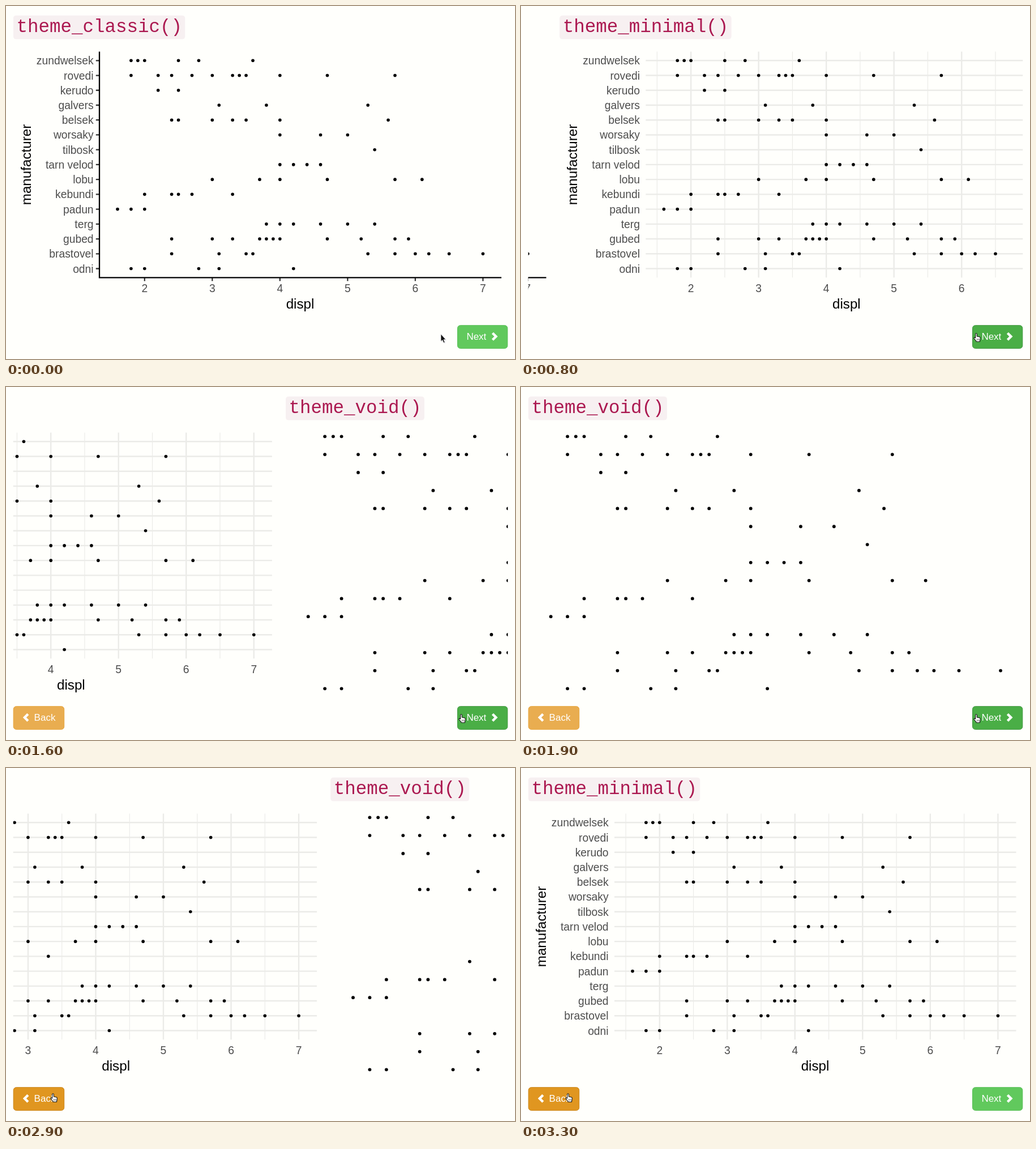
Recreate the animation shown at these times as an HTML page. Size 899 by 623 pixels, loop 3.5 s.

```html
<!DOCTYPE html>
<html lang="en">
<head>
<meta charset="utf-8">
<title>Plot themes</title>
<style>
  html, body { margin: 0; width: 100%; height: 100%; overflow: hidden; background: #fffffc; }
  svg { display: block; width: 899px; height: 623px; font-family: "Liberation Sans", Arial, sans-serif; }
  .code { font: 32.5px "Liberation Mono", "Courier New", monospace; fill: #ab1850; }
  .label { font-size: 19.3px; fill: #4d4d4d; }
  .axis { font-size: 24.2px; fill: #000; }
  .btn { font-size: 17px; fill: #fff; }
</style>
</head>
<body>
<script>
const LOOP = 3500, TICK = 100, STEP = 885.8, SLIDE = 400;

// label and engine sizes, top row first
const ROWS = [
  ['zundwelsek', 1.8, 1.9, 2, 2.5, 2.8, 3.6],
  ['rovedi', 1.8, 2.2, 2.4, 2.7, 3, 3.3, 3.4, 3.5, 4, 4.7, 5.7],
  ['kerudo', 2.2, 2.5],
  ['galvers', 3.1, 3.8, 5.3],
  ['belsek', 2.4, 2.5, 3, 3.3, 3.5, 4, 5.6],
  ['worsaky', 4, 4.6, 5],
  ['tilbosk', 5.4],
  ['tarn velod', 4, 4.2, 4.4, 4.6],
  ['lobu', 3, 3.7, 4, 4.7, 5.7, 6.1],
  ['kebundi', 2, 2.4, 2.5, 2.7, 3.3],
  ['padun', 1.6, 1.8, 2],
  ['terg', 3.8, 4, 4.2, 4.6, 5, 5.4],
  ['gubed', 2.4, 3, 3.3, 3.7, 3.8, 3.9, 4, 4.7, 5.2, 5.7, 5.9],
  ['brastovel', 2.4, 3.1, 3.5, 3.6, 5.3, 5.7, 6, 6.2, 6.5, 7],
  ['odni', 1.8, 2, 2.8, 3.1, 4.2]
];

function add(parent, tag, attrs = {}, text) {
  const el = document.createElementNS('http://www.w3.org/2000/svg', tag);
  for (const key in attrs) el.setAttribute(key, attrs[key]);
  if (text) el.textContent = text;
  parent.appendChild(el);
  return el;
}

const line = (g, x1, y1, x2, y2, stroke, width) =>
  add(g, 'line', { x1, y1, x2, y2, stroke, 'stroke-width': width });
const show = (el, on) => el.setAttribute('visibility', on ? 'visible' : 'hidden');
const move = (el, x, y = 0) => el.setAttribute('transform', `translate(${x} ${y})`);

const svg = add(document.body, 'svg', { viewBox: '0 0 899 623' });
const clip = add(svg, 'clipPath', { id: 'view' });
add(clip, 'rect', { x: 12.7, y: 0, width: 873.6, height: 560 });
const view = add(svg, 'g', { 'clip-path': 'url(#view)' });
const strip = add(view, 'g');

// plot scales: value to x, row to y
const framed = { x: v => 244.8 + (v - 2) * 119.52, y: i => 96.3 + i * 26.23, r: 2.8 };
const bare = { x: v => 82 + (v - 1.8) * 147.1, y: i => 87.3 + i * 31.79, r: 2.9 };

function addSlide(index, title) {
  const g = add(strip, 'g', { transform: `translate(${index * STEP} 0)` });
  add(g, 'rect', { x: 12.8, y: 16.8, width: title.length * 19.5 + 11, height: 41.8, rx: 5, fill: '#f7f0f1' });
  add(g, 'text', { class: 'code', x: 18.4, y: 46.4 }, title);
  return g;
}

function addDots(g, s) {
  ROWS.forEach(([, ...values], i) => values.forEach(v =>
    add(g, 'circle', { cx: s.x(v), cy: s.y(i), r: s.r })));
}

function addLabels(g, s) {
  ROWS.forEach(([name], i) =>
    add(g, 'text', { class: 'label', x: 154.6, y: s.y(i) + 7, 'text-anchor': 'end' }, name));
  for (let v = 2; v <= 7; v++)
    add(g, 'text', { class: 'label', x: s.x(v), y: 504.7, 'text-anchor': 'middle' }, String(v));
  add(g, 'text', { class: 'axis', x: 519.5, y: 533.8, 'text-anchor': 'middle' }, 'displ');
  add(g, 'text', { class: 'axis', transform: 'translate(44 280) rotate(-90)', 'text-anchor': 'middle' }, 'manufacturer');
}

function addAxes(g, s) {
  ROWS.forEach((_, i) => line(g, 158.8, s.y(i), 165, s.y(i), '#333', 2.3));
  for (let v = 2; v <= 7; v++) line(g, s.x(v), 479, s.x(v), 485.4, '#333', 2.3);
  add(g, 'path', { d: 'M165 80.4V479.3H875', fill: 'none', stroke: '#000', 'stroke-width': 2.3 });
}

function addGrid(g, s) {
  const color = '#ebebe8';
  for (let v = 1.5; v <= 7; v += 0.5)
    line(g, s.x(v), 80.4, s.x(v), 479.3, color, v % 1 ? 1.2 : 2.4);
  ROWS.forEach((_, i) => line(g, 165, s.y(i), 874.5, s.y(i), color, 2.4));
}

const classic = addSlide(0, 'theme_classic()');
addDots(classic, framed);
addAxes(classic, framed);
addLabels(classic, framed);

const minimal = addSlide(1, 'theme_minimal()');
addGrid(minimal, framed);
addDots(minimal, framed);
addLabels(minimal, framed);

addDots(addSlide(2, 'theme_void()'), bare);

// fill and border for each button state
const GREEN = { idle: ['#61c95d', '#57bf54'], hover: ['#4aae46', '#3f963c'], down: ['#3f963c', '#2f6b2c'] };
const AMBER = { idle: ['#e9ad50', '#e6a43b'], hover: ['#e09620', '#cb8415'], down: ['#cb8415', '#95610f'] };

function addButton(x, width, text, textX, chevron) {
  const g = add(svg, 'g');
  const box = add(g, 'rect', { x: x + 0.5, y: 563.7, width: width - 1, height: 40.6, rx: 5 });
  add(g, 'text', { class: 'btn', x: textX, y: 589.2 }, text);
  add(g, 'path', { d: chevron, fill: 'none', stroke: '#fff', 'stroke-width': 4.4 });
  return { g, box };
}

const next = addButton(797, 89.3, 'Next', 813.4, 'M859.4 577.2l6 6l-6 6');
const back = addButton(12.7, 90.5, 'Back', 49.6, 'M38.9 577.2l-6 6l6 6');

function paint(button, [fill, stroke]) {
  button.box.setAttribute('fill', fill);
  button.box.setAttribute('stroke', stroke);
}

const arrow = add(svg, 'g');
const arrowShape = 'M0 0V13L2.8 10.5L5 15.4L7.1 14.4L5 9.7H8.8Z';
add(arrow, 'path', { d: arrowShape, transform: 'translate(1 1)', fill: '#99a', opacity: 0.4 });
add(arrow, 'path', { d: arrowShape, fill: '#111', stroke: '#fff', 'stroke-width': 0.7 });

const hand = add(svg, 'g');
add(hand, 'path', {
  d: 'M-.8 8V1a1.3 1.3 0 0 1 2.6 0V5l4.6 1q1.4.4 1.4 1.8v2.6q0 1.2-.8 2.2V14.2H.4V13L-3.4 8.8q-.5-1.4.8-1.7Z',
  fill: '#fff', stroke: '#111', 'stroke-width': 1.1, 'stroke-linejoin': 'round'
});
add(hand, 'path', { d: 'M2 9v3M4 9v3M6 9v3', stroke: '#333', 'stroke-width': 0.7 });

// [time, value] tables; each value holds until the next time
const at = (table, t) => table.filter(row => row[0] <= t).pop();
const CURSOR = [
  [0, 768, 579], [300, 774, 580], [400, 790, 579, 1], [500, 803.5, 578, 1],
  [2000, 720, 585], [2100, 428, 584], [2200, 232, 580], [2300, 136, 577],
  [2400, 106, 576], [2600, 82.5, 575, 1]
];
const NEXT = [
  [0, 'idle'], [400, 'hover'], [500, 'down'], [600, 'hover'], [1400, 'down'],
  [1600, 'hover'], [2000, ''], [3300, 'idle']
];
const BACK = [[0, ''], [1000, 'idle'], [2600, 'hover'], [2700, 'down'], [2900, 'hover']];
const MOVES = [[600, 1], [1543.4, 1], [2811.4, -1]];

const easeOut = p => 1 - (1 - p) ** 4;
const position = t => MOVES.reduce((sum, [start, dir]) =>
  sum + dir * easeOut(Math.min(1, Math.max(0, (t - start) / SLIDE))), 0);

function setButton(button, table, colors, t) {
  const state = at(table, t)[1];
  show(button.g, state);
  if (state) paint(button, colors[state]);
}

function draw(time) {
  const t = Math.floor((time + 4) % LOOP / TICK) * TICK;
  move(strip, -STEP * position(t));
  setButton(next, NEXT, GREEN, t);
  setButton(back, BACK, AMBER, t);
  const [, x, y, pointing] = at(CURSOR, t);
  show(hand, pointing);
  show(arrow, !pointing);
  move(pointing ? hand : arrow, x, y);
}

const begin = performance.now();
function run() {
  draw(performance.now() - begin);
  requestAnimationFrame(run);
}
run();
</script>
</body>
</html>
```
